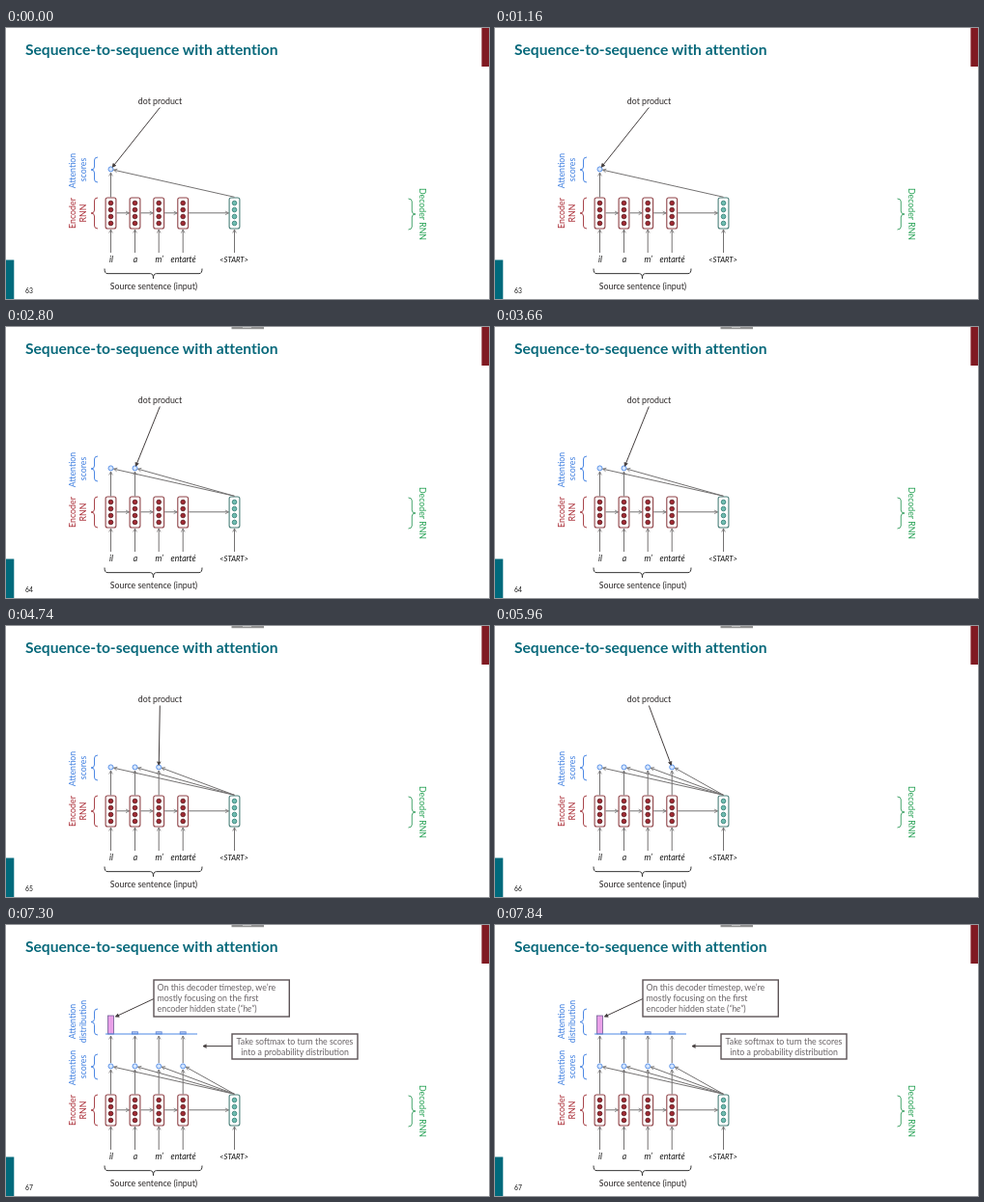
An HTML page for the animation above (8 s loop, 500x281 px).

```html
<!DOCTYPE html>
<html lang="en">
<head>
<meta charset="utf-8">
<title>Sequence-to-sequence with attention</title>
<style>
  html, body { margin: 0; width: 100%; height: 100%; overflow: hidden; background: #fff; }
  svg { display: block; width: 500px; height: 281px; }
  text { font: 8.8px Lato, "Open Sans", sans-serif; fill: #292525; text-anchor: middle; }
  .title { font-size: 15.6px; font-weight: 700; fill: #08697b; text-anchor: start; font-variant-ligatures: none; }
  .word { font-size: 8.6px; font-style: italic; fill: #111; }
  .start { font-size: 7.7px; }
  .page { font-size: 6.8px; fill: #111; text-anchor: start; }
  .note text { fill: #686265; }
  .note rect { fill: #fff; stroke: #5c5356; stroke-width: 1.4; }
  .left text { text-anchor: start; }
  .red { fill: #a92a34; }
  .blue { fill: #3f7fe0; }
  .green { fill: #23a052; }
  .arrow { stroke: #747272; stroke-width: 1; marker-end: url(#head); }
  .pointer { stroke: #443e3e; stroke-width: 1; marker-end: url(#tip); }
  .axis { stroke: #4d88e4; stroke-width: 1; }
  .brace { fill: none; stroke-width: 1; }
  [class^="step"] { animation: 8s step-end infinite; }
  .step0 { animation-name: step0; }
  .step1 { animation-name: step1; }
  .step2 { animation-name: step2; }
  .step3 { animation-name: step3; }
  .step4 { animation-name: from4; }
  .stepfrom1 { animation-name: from1; }
  .stepfrom2 { animation-name: from2; }
  .stepfrom3 { animation-name: from3; }
  .steptab { animation-name: tab; }
  @keyframes step0 { 0% { visibility: visible } 35%, 100% { visibility: hidden } }
  @keyframes step1 { 0% { visibility: hidden } 35% { visibility: visible } 50.5%, 100% { visibility: hidden } }
  @keyframes step2 { 0% { visibility: hidden } 50.5% { visibility: visible } 67.5%, 100% { visibility: hidden } }
  @keyframes step3 { 0% { visibility: hidden } 67.5% { visibility: visible } 90.5%, 100% { visibility: hidden } }
  @keyframes from1 { 0% { visibility: hidden } 35%, 100% { visibility: visible } }
  @keyframes from2 { 0% { visibility: hidden } 50.5%, 100% { visibility: visible } }
  @keyframes from3 { 0% { visibility: hidden } 67.5%, 100% { visibility: visible } }
  @keyframes from4 { 0% { visibility: hidden } 90.5%, 100% { visibility: visible } }
  @keyframes tab { 0% { opacity: 0 } 35% { opacity: 1 } 90% { opacity: .45 } 90.5%, 100% { opacity: 1 } }
</style>
</head>
<body>
<svg id="stage" viewBox="0 0 500 281"></svg>
<script>
const cols = [108.5, 133.5, 158.2, 183.2];
const decX = 236.5, scoreY = 146.4;
const RED = '#a8454c', BLUE = '#4d88e4', GREEN = '#46a56c';

const text = (x, y, s, cls = '') => `<text x="${x}" y="${y}" class="${cls}">${s}</text>`;
const turned = (x, y, deg, s, cls) =>
  `<g transform="translate(${x} ${y}) rotate(${deg})">${text(0, 3, s, cls)}</g>`;
const rect = (x, y, w, h, attrs = '') => `<rect x="${x}" y="${y}" width="${w}" height="${h}" ${attrs}/>`;
const line = (x1, y1, x2, y2, cls = 'arrow') =>
  `<line x1="${x1}" y1="${y1}" x2="${x2}" y2="${y2}" class="${cls}"/>`;
const dot = (x, y, r, fill, stroke) =>
  `<circle cx="${x}" cy="${y}" r="${r}" fill="${fill}" stroke="${stroke}" stroke-width=".9"/>`;
const group = (cls, body) => `<g class="${cls}">${body}</g>`;

// Curly brace opening at x = a with its point at x = b.
function brace(a, b, top, end, color, attrs = '') {
  const m = (a + b) / 2, c = (top + end) / 2;
  return `<path class="brace" stroke="${color}" ${attrs} d="M${a} ${top}Q${m} ${top} ${m} ${top + 3}
    V${c - 3}Q${m} ${c} ${b} ${c}Q${m} ${c} ${m} ${c + 3}V${end - 3}Q${m} ${end} ${a} ${end}"/>`;
}

function cell(x, frame, fill, edge) {
  let out = rect(x - 5.4, 176, 10.8, 32, `rx="2" fill="#fff" stroke="${frame}" stroke-width="1.1"`);
  for (let i = 0; i < 4; i++) out += dot(x, 181.5 + 7 * i, 2.3, fill, edge);
  return out + line(x, 233, x, 209);
}

const score = x =>
  line(x, 175.5, x, 150) + line(decX, 175.3, x + 3, scoreY + .8) +
  dot(x, scoreY, 2.5, '#d5e6ff', BLUE);

// Runs from the label almost to the centre of the score at x.
function pointer(x) {
  const top = 82.5, label = 159.3, gap = .035;
  return line(label, top, x + (label - x) * gap, scoreY - (scoreY - top) * gap, 'pointer');
}

const marker = (id, color, fill) =>
  `<marker id="${id}" markerUnits="userSpaceOnUse" markerWidth="6" markerHeight="6" refX="4.5" refY="3" orient="auto">
    <path d="M1 1.2L4.5 3L1 4.8" fill="${fill}" stroke="${color}" stroke-width=".8"/></marker>`;

function note(x, y, w, h, align, rows) {
  const tx = align === 'left' ? x + 3.6 : x + w / 2;
  return group('note ' + align,
    rect(x, y, w, h) + rows.map((s, i) => text(tx, y + 11.3 + 11 * i, s)).join(''));
}

function base() {
  const words = ['il', 'a', 'm’', 'entarté'];
  return rect(492.4, 0, 7.6, 40, 'fill="#801a22"') + rect(0, 240.5, 8.3, 40.5, 'fill="#006a7c"') +
    text(20, 28, 'Sequence-to-sequence with attention', 'title') +
    cols.map((x, i) => cell(x, '#8f4348', '#a02a33', '#5f1d22') +
      line(x + 6, 191.8, (cols[i + 1] || decX) - 6, 191.8) +
      text(x + .4, 243, words[i], 'word')).join('') +
    cell(decX, '#4a7f79', '#6fbcb0', '#3d857c') +
    text(236, 243, '&lt;START&gt;', 'word start') +
    turned(69.2, 192, -90, 'Encoder', 'red') + turned(80.3, 192, -90, 'RNN', 'red') +
    brace(95, 88, 176, 208, RED) +
    turned(69, 148, -90, 'Attention', 'blue') + turned(80, 147, -90, 'scores', 'blue') +
    brace(95, 88, 134, 160, BLUE) +
    turned(431, 193, 90, 'Decoder RNN', 'green') + brace(416.5, 424, 177, 209, GREEN) +
    brace(249.5, 259.8, 102, 203, '#333', 'transform="matrix(0 1 1 0 0 0)"') +
    text(153, 270.5, 'Source sentence (input)');
}

function distribution() {
  const bars = cols.map((x, i) => {
    const h = i ? 2.2 : 19;
    const [fill, edge] = i ? ['#b9cdf5', '#5f82d0'] : ['#e9a0e8', '#705c94'];
    return line(x, 143, x, 115) +
      rect(x - 3, 113 - h, 6, h, `fill="${fill}" stroke="${edge}" stroke-width=".8"`);
  }).join('');
  return bars + line(103, 113, 198, 113, 'axis') +
    turned(69, 100, -90, 'Attention', 'blue') + turned(80, 100, -90, 'distribution', 'blue') +
    brace(95, 88, 87, 114, BLUE) +
    line(153, 76.5, 113.5, 95, 'pointer') + line(234, 125.6, 204, 125.6, 'pointer') +
    note(153, 57, 140.3, 38, 'left', ['On this decoder timestep, we’re', 'mostly focusing on the first',
      'encoder hidden state (<tspan font-style="italic">“he”</tspan>)']) +
    note(234, 113, 130, 26, 'middle', ['Take softmax to turn the scores', 'into a probability distribution']);
}

let art = `<defs>${marker('head', '#747272', 'none')}${marker('tip', '#443e3e', '#443e3e')}</defs>` + base();
cols.forEach((x, i) => {
  art += group(i ? `stepfrom${i}` : 'score', score(x));
  art += group(`step${i}`, pointer(x) + text(159.5, 78.5, 'dot product') + text(20, 274.5, 63 + i, 'page'));
});
art += group('step4', distribution() + text(20, 274.5, 67, 'page'));
art += group('steptab', rect(233.5, 0, 33.5, 2.2, 'fill="#929292"') + rect(245, 0, 9, 1, 'fill="#c4c4c4"'));
document.getElementById('stage').innerHTML = art;
</script>
</body>
</html>
```
